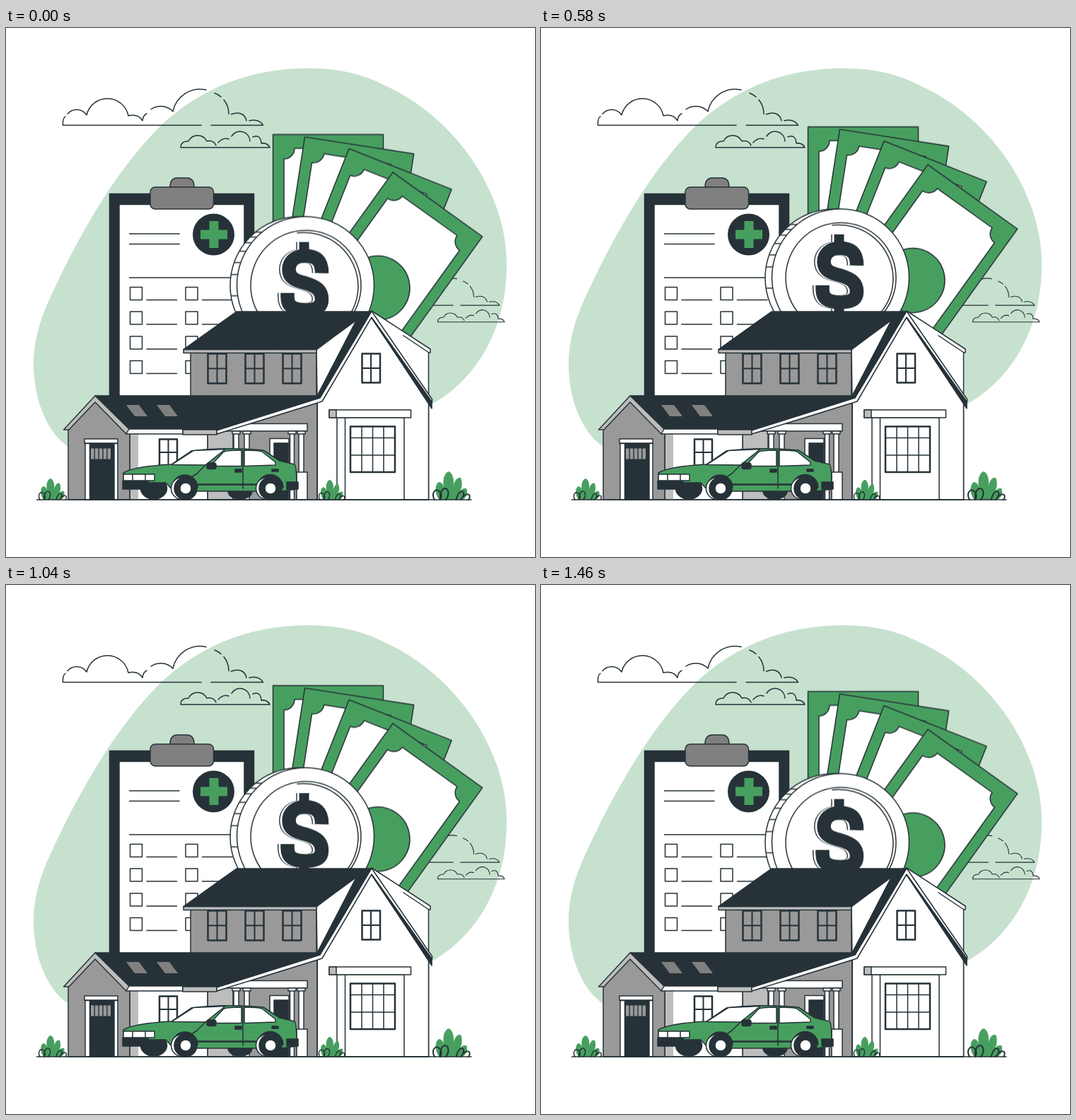
An HTML page without scripts that plays this animation: 748 px wide and 748 px high, repeating every 1500 ms.

```html
<!DOCTYPE html>
<html lang="en">
<head>
<meta charset="utf-8">
<title>Home, car and health cover</title>
<style>
  html, body { margin: 0; height: 100%; overflow: hidden; background: #fff; }
  svg { display: block; width: 100vw; height: 100vh; }
  .line { fill: none; stroke: #263238; stroke-width: 1.5; stroke-linecap: round; stroke-linejoin: round; }
  .line * { vector-effect: non-scaling-stroke; }
  .white { fill: #fff; }
  .green { fill: #479f5f; }
  .dark { fill: #263238; }
  .grey { fill: #999; }
  .pale { fill: #bdbdbd; }
  .mid { fill: #808080; }
  .bold { stroke-width: 2.5; }
  .money { animation: float .75s steps(18, jump-none) -2ms infinite alternate; }
  @keyframes float {
    from { transform: translateY(-.417px); }
    to { transform: translateY(-14.583px); }
  }
</style>
</head>
<body>
<svg viewBox="0 0 748 748">
  <defs>
    <g id="clouds">
      <path d="M276 137.500H80.500C80 131 81 127 84 125M87 121.500A17 17 0 0 1 114 123A30.200 30.200 0 0 1 173 124Q187 121 193 131Q194 123 199 121M205 115A24 24 0 0 1 236 118A39 39 0 0 1 283 87.500M295 92Q300 94 304 97.500M308 101.500Q315 110 315 121.500M318.500 122C329 118 338 121 340 131M344 131Q358 128 363.500 137.500H290"/>
      <path d="M373 169H247Q247 160 258 160A14.500 14.500 0 0 1 284 160Q293 158 297 166M300 162Q307 154 315 157M319 153A14 14 0 0 1 345 160M349 154Q360 150 361 163Q370 162 373 169"/>
    </g>
    <g id="bill">
      <path class="green" d="M0 0H156V291H0Z"/>
      <path class="white" d="M30.500 19.500H126A15 15 0 0 0 141 34.500V257A15 15 0 0 0 126 272H30.500A15 15 0 0 0 15.500 257V34.500A15 15 0 0 0 30.500 19.500Z"/>
      <circle class="green" cx="78" cy="145.500" r="45.500"/>
    </g>
    <g id="dollar" fill="none">
      <path stroke-width="19.500" d="M446.500 347C447 328 437 322.500 423 322.500C408 322.500 400 331 400 342C400 354 410 358 423 361C440 366 446.500 372 446.500 384C446.500 395 438 399 423 399C406 399 398 394 398 380V375"/>
      <path stroke-width="14" d="M421.500 303V322M421.500 398V416"/>
    </g>
    <path id="check" d="M0 0H17V18H0ZM23.500 18H66"/>
    <g id="pane">
      <path class="bold" d="M0 0H26V42H0Z"/>
      <path d="M13 0V42M0 21H26" stroke-width="2"/>
    </g>
    <g id="bush">
      <path class="green" stroke="none" d="M8 0C2-8 4-18 8-19Q12-18 13-13C11-22 14-29 18-30C23-28 24-20 23-14C24-21 28-25 31-23C33-18 32-12 30-9Q33-13 37-12C39-6 36-1 32 0Z"/>
      <path d="M3 0C-1-7 4-13 8-9Q12-5 9 0C8-10 14-15 17-10Q19-5 15 0M26 0C28-9 33-11 34-7Q34-3 31 0Q36-8 40-5Q41-2 39 0"/>
    </g>
  </defs>

  <path fill="#c7e1cf" d="M427 57C470 57 505 65 535 81C628 122 708 225 708 335C708 420 670 495 600 533L88 592C55 570 39 520 39 475C39 420 66 375 82 340C115 275 160 195 222 135C280 82 350 57 427 57Z"/>

  <g class="line">
    <use href="#clouds"/>
    <use href="#clouds" transform="translate(425.200 289) scale(.75)"/>
  </g>

  <!-- clipboard -->
  <g class="line">
    <path class="dark" d="M146.500 234.500H350.500V530H146.500Z"/>
    <path class="white" d="M160 249.500H337V530H160Z"/>
    <path class="mid" d="M232 226V223Q233 212 242 212H256Q265 212 266 223V226Z"/>
    <rect class="mid" x="204" y="225" width="89.500" height="31" rx="7"/>
    <path d="M174.500 291H245M174.500 305.500H245M174.500 353H330"/>
    <use href="#check" x="175.500" y="366.500"/><use href="#check" x="254" y="366.500"/>
    <use href="#check" x="175.500" y="401"/><use href="#check" x="254" y="401"/>
    <use href="#check" x="175.500" y="436"/><use href="#check" x="254" y="436"/>
    <use href="#check" x="175.500" y="470.500"/><use href="#check" x="254" y="470.500"/>
  </g>
  <circle class="dark" cx="293.500" cy="292" r="29.500"/>
  <path d="M275 292H313M294 273V311" stroke="#479f5f" stroke-width="13"/>

  <g class="money">
    <g class="line">
      <use href="#bill" transform="translate(377.500 151)"/>
      <use href="#bill" transform="translate(422.500 154.400) rotate(8.800)"/>
      <use href="#bill" transform="translate(485 171) rotate(21.600)"/>
      <use href="#bill" transform="translate(547 204.400) rotate(35.700)"/>
      <circle class="white" cx="414.500" cy="364.400" r="97.500"/>
      <path d="M362 289h-9.500M355 296h-9.500M348 304h-9.500M340 316h-9.500M332.500 332h-9.500M328 349h-9.500M328 379h-9.500"/>
      <circle class="white" cx="423.500" cy="364" r="97"/>
      <circle cx="424" cy="364.400" r="78"/>
      <path d="M412 290A77 77 0 0 1 498 365A77 77 0 0 1 430 441"/>
    </g>
    <use href="#dollar" x="-4.200" stroke="#263238"/>
    <use href="#dollar" x="-2.800" stroke="#fff"/>
    <use href="#dollar" stroke="#263238"/>
  </g>

  <!-- main house -->
  <g class="line">
    <path class="white" d="M517 400L600 454V459H597.500V667H440V460Z"/>
    <path d="M562 435L598 459"/>
    <path class="grey" d="M261 459H439V530H261Z"/>
    <use href="#pane" x="285.500" y="460.500"/><use href="#pane" x="338.500" y="460.500"/><use href="#pane" x="391.500" y="460.500"/>
    <path class="white" d="M439 455L500 408L440 522Z"/>
    <path class="pale" d="M251 454.500H439V459.500H251Z"/>
    <path class="dark" d="M326 401H517L500 410L439 454.500H251Z"/>
    <path class="grey" d="M285 574L298 574L440 530V667H285Z"/>
    <path class="pale" d="M285 574H298L321 567V667H285Z"/>
  </g>

  <!-- porch -->
  <g class="line">
    <path class="white" d="M373 580.500H400V667H373Z"/>
    <path class="dark" d="M379 587H399V667H379Z"/>
    <path class="white" d="M318 559.500H426V570H312Z"/>
    <path class="white" d="M322 574H329V667H322ZM337 574H344V667H337ZM401.500 574H407.500V667H401.500ZM414 574H421V628H414ZM320 570H331V574H320ZM335 570H346V574H335ZM399 570H410V574H399ZM412 570H423V574H412ZM411 628H426V667H411Z"/>
  </g>

  <!-- garage wing -->
  <g class="line">
    <path class="white" d="M176 573H285V667H176Z"/>
    <path class="pale" d="M176 573H187V667H176Z" stroke="none"/>
    <path class="white bold" d="M217 581.500H242V620H217Z"/>
    <path d="M229.500 582V620M217 600H242" stroke-width="2"/>
    <path class="grey" d="M126 524L88 568V667H175V572Z"/>
    <path class="white" d="M112 587H158V667H112ZM111 581H158V587.500H111Z"/>
    <path class="dark" d="M118.500 588H153V667H118.500Z"/>
    <path d="M120 602H148" stroke="#999" stroke-width="15" stroke-dasharray="4.500 1.400" stroke-linecap="butt"/>
    <path class="dark" d="M126 520H440L496 412L517 402L446 527L298 571V568L172 567Z"/>
    <path class="white" d="M170 567H250V574H170Z"/>
    <path class="pale" d="M250 568H298V575H250Z"/>
    <path class="pale" d="M126 520L81.500 568H89L126 529L170 574L174 567Z"/>
    <path class="mid" stroke="none" d="M170 533h18l12 16h-18ZM213 533h18l12 16h-18Z"/>
  </g>

  <!-- front gable -->
  <g class="line">
    <path class="white" stroke="none" d="M517 410L446 529L441 531V666H597V530Z"/>
    <path d="M440 531V667H597.500V530"/>
    <path class="dark" d="M517 402L602 526V538L517 410Z"/>
    <path class="white" d="M517 400.500L602.500 525V529L517 409L447 528L298 574V569L444 523Z"/>
    <path class="white bold" d="M503.500 460.500H529V501.500H503.500Z"/>
    <path d="M516 461V501M504 481H529" stroke-width="2"/>
    <path class="white" d="M468 551H563V667H468ZM479.500 551V667"/>
    <path class="white" d="M457 540H572.500V551H457Z"/>
    <path class="pale" d="M457 540H467V551H457Z"/>
    <path class="white bold" d="M487 563.500H550V628H487Z"/>
    <path d="M503 564V628M518.500 564V628M534 564V628M487 579.500H550M487 604H550"/>
  </g>

  <!-- car -->
  <g class="line">
    <ellipse class="dark" cx="209" cy="651" rx="18.500" ry="15"/>
    <ellipse class="dark" cx="331" cy="655" rx="17" ry="11"/>
    <path class="green" d="M166 629Q180 620 234 617L262 598Q310 592 364 597L387 612L408 617Q411 619 411 652L390 655H237L226 643H166Z"/>
    <path class="white" d="M234 617.500L265 597.500L310 595.500L282 618Z"/>
    <path class="white" d="M289 619.500L307 600Q310 597 333 597V619.500ZM337 597Q355 597 362 599L381 614V618L337 619.500Z"/>
    <path d="M282 618L270 630L247 645M335 597V651"/>
    <path d="M270 645.500H356" stroke-width="2.500"/>
    <rect class="dark" x="284" y="615" width="13" height="8.500" rx="3"/>
    <path class="dark" d="M324 624H333V628H324ZM376 624H385V627H376ZM165 640.500H201L203 652H165ZM397 642H413V652H397Z"/>
    <path class="white" d="M166 631H210V640H166ZM179 631V640M197 631V640"/>
    <path class="dark" d="M235 650A18 18 0 0 1 271 650ZM355 650A18 18 0 0 1 392 650Z"/>
    <circle class="white" cx="249" cy="651" r="15.500"/>
    <circle class="dark" cx="254" cy="651" r="16"/>
    <circle class="white" cx="254" cy="651" r="8"/>
    <circle class="white" cx="369" cy="651" r="15.500"/>
    <circle class="dark" cx="374" cy="651" r="16"/>
    <circle class="white" cx="374" cy="651" r="8"/>
  </g>

  <g class="line">
    <use href="#bush" transform="translate(45 667)"/>
    <use href="#bush" transform="translate(441 667) scale(.94)"/>
    <use href="#bush" transform="translate(602 667) scale(1.330)"/>
    <path d="M43.500 667H658"/>
  </g>
</svg>
</body>
</html>
```
